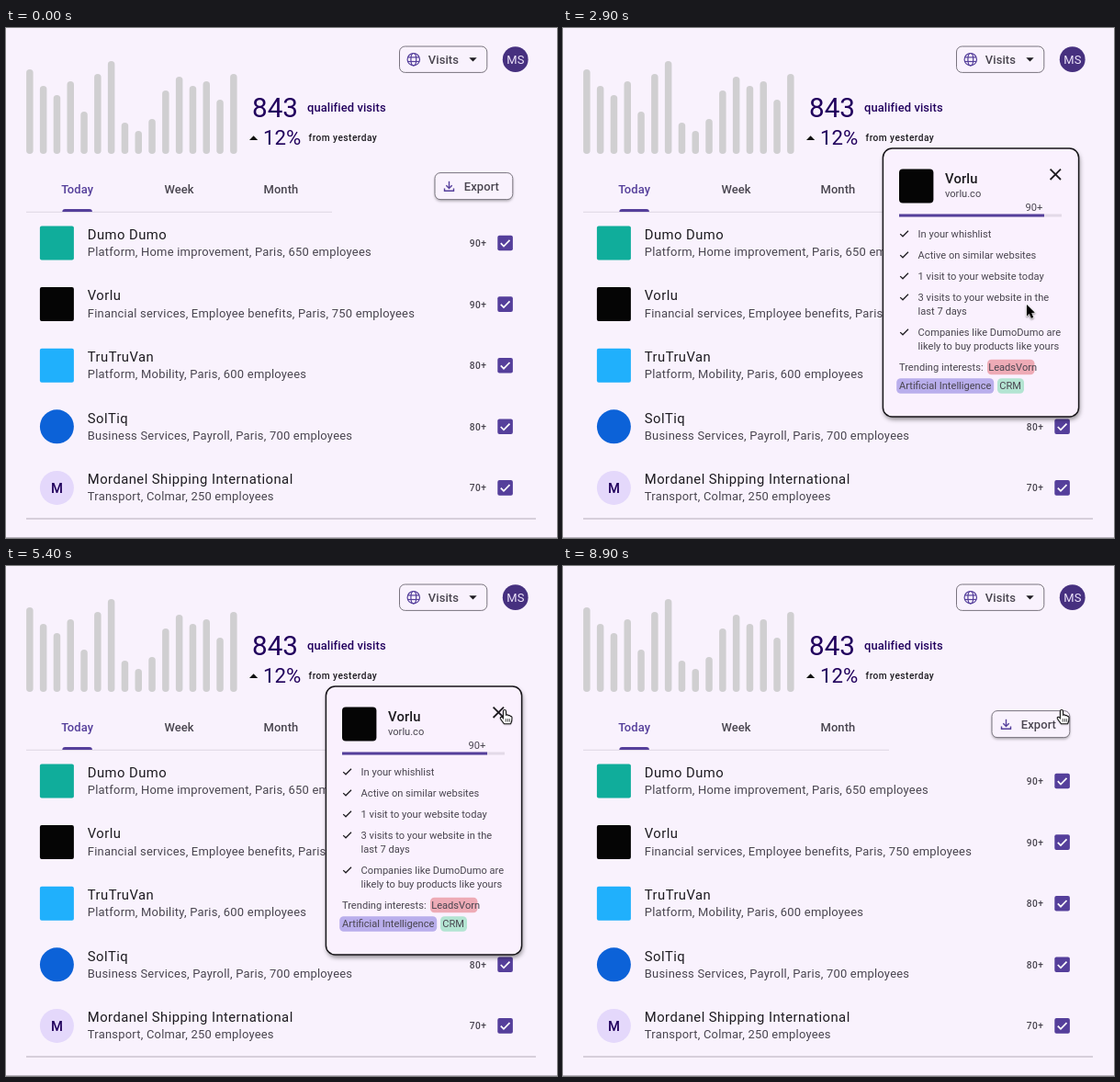
An HTML page with a canvas for the animation above (9000 ms loop, 600x555 px).

```html
<!DOCTYPE html>
<html lang="en">
<head>
<meta charset="utf-8">
<title>Qualified visits</title>
<style>
  html, body { margin: 0; width: 100%; height: 100%; overflow: hidden; background: #f9f2fd; }
  canvas { display: block; width: 600px; height: 555px; }
</style>
</head>
<body>
<canvas id="stage"></canvas>
<script>
const W = 600, H = 555, LOOP = 9000, STEP = 100;
const INK = '#1d1b20', GREY = '#49454f', PURPLE = '#553f9b', DEEP = '#21005d', BG = '#f9f2fd';
const POPUP_OPEN = 1700, POPUP_CLOSE = 5900, HAND_FROM = 4500;

const canvas = document.getElementById('stage');
const dpr = window.devicePixelRatio || 1;
canvas.width = W * dpr;
canvas.height = H * dpr;
const c = canvas.getContext('2d');

const BAR_TOPS = [45, 63, 73, 58, 91, 50, 36, 103, 112, 99, 68, 53, 63, 58, 78, 50];

const ROWS = [
  { name: 'Dumo Dumo', info: 'Platform, Home improvement, Paris, 650 employees', score: '90+', color: '#10ad9b' },
  { name: 'Vorlu', info: 'Financial services, Employee benefits, Paris, 750 employees', score: '90+', color: '#050505' },
  { name: 'TruTruVan', info: 'Platform, Mobility, Paris, 600 employees', score: '80+', color: '#20b0fc' },
  { name: 'SolTiq', info: 'Business Services, Payroll, Paris, 700 employees', score: '80+', color: '#0c62d8', round: true },
  { name: 'Mordanel Shipping International', info: 'Transport, Colmar, 250 employees', score: '70+', color: '#e4d8fb', round: true, initial: 'M' }
];

const REASONS = [
  [228, 'In your whishlist'],
  [251, 'Active on similar websites'],
  [274, '1 visit to your website today'],
  [297, '3 visits to your website in the', 'last 7 days'],
  [335, 'Companies like DumoDumo are', 'likely to buy products like yours']
];

// time, x, y of the pointer tip
const PATH = [
  [100, 300, 492], [800, 383, 318], [1900, 383, 318],
  [2900, 505, 301], [3800, 545, 243], [4600, 543, 157]
];

function text(s, x, y, size, color, { weight = 400, gap = 0, align = 'left' } = {}) {
  c.font = `${weight} ${size}px Roboto, sans-serif`;
  c.letterSpacing = gap + 'px';
  c.textAlign = align;
  c.fillStyle = color;
  c.fillText(s, x, y);
}

function box(x, y, w, h, r, fill, stroke, line = 1) {
  c.beginPath();
  c.roundRect(x, y, w, h, r);
  if (fill) { c.fillStyle = fill; c.fill(); }
  if (stroke) { c.strokeStyle = stroke; c.lineWidth = line; c.stroke(); }
}

function disc(x, y, r, fill) {
  c.beginPath();
  c.arc(x, y, r, 0, Math.PI * 2);
  c.fillStyle = fill;
  c.fill();
}

function trace(points, closed) {
  c.beginPath();
  points.forEach(([x, y], i) => i ? c.lineTo(x, y) : c.moveTo(x, y));
  if (closed) c.closePath();
}

function line(points, color, width) {
  trace(points);
  c.strokeStyle = color;
  c.lineWidth = width;
  c.stroke();
}

function fillShape(points, color) {
  trace(points, true);
  c.fillStyle = color;
  c.fill();
}

function withShadow(color, blur, dx, dy, draw) {
  c.save();
  c.shadowColor = color;
  c.shadowBlur = blur * dpr;
  c.shadowOffsetX = dx * dpr;
  c.shadowOffsetY = dy * dpr;
  draw();
  c.restore();
}

function globe(x, y) {
  c.strokeStyle = PURPLE;
  c.lineWidth = 1.2;
  for (const rx of [6.7, 2.9]) {
    c.beginPath();
    c.ellipse(x, y, rx, 6.7, 0, 0, Math.PI * 2);
    c.stroke();
  }
  for (const dy of [-2.3, 2.3]) line([[x - 6.2, y + dy], [x + 6.2, y + dy]], PURPLE, 1.2);
}

function downloadIcon(x, y) {
  line([[x, y - 5.5], [x, y + 1.8]], PURPLE, 1.4);
  line([[x - 3.2, y - 1], [x, y + 2.2], [x + 3.2, y - 1]], PURPLE, 1.4);
  line([[x - 5, y + 2.3], [x - 5, y + 5], [x + 5, y + 5], [x + 5, y + 2.3]], PURPLE, 1.4);
}

function header() {
  BAR_TOPS.forEach((top, i) => box(22.1 + i * 14.8, top, 7.5, 137 - top, 3.75, '#d0cfd1'));

  text('843', 268, 96.5, 29.6, DEEP);
  text('qualified visits', 328, 91, 12.95, DEEP, { weight: 500, gap: .09 });
  fillShape([[265, 122], [274.2, 122], [269.6, 117.2]], '#111');
  text('12%', 280, 127, 22.2, DEEP);
  text('from yesterday', 329.6, 123, 10.18, INK, { weight: 500, gap: .46 });

  box(428.5, 20, 95.3, 28.4, 6, null, '#79747e');
  globe(443.8, 34.2);
  text('Visits', 459.8, 38.8, 12.95, GREY, { weight: 500, gap: .09 });
  fillShape([[504.3, 32.3], [512.7, 32.3], [508.5, 36.6]], INK);

  disc(554.7, 34.2, 13.9, '#46307f');
  text('MS', 554.9, 38.7, 12.95, '#eee5fb', { align: 'center', gap: .2 });
}

function tabs() {
  box(22, 199.8, 333, 1, 0, '#ddd5e2');
  const style = { weight: 500, gap: .09, align: 'center' };
  text('Today', 77.6, 180.4, 12.95, PURPLE, style);
  text('Week', 188.6, 180.4, 12.95, GREY, style);
  text('Month', 299.4, 180.4, 12.95, GREY, style);
  box(61.3, 197, 32.6, 3, [3, 3, 0, 0], PURPLE);

  withShadow('rgba(0,0,0,.3)', 3, 0, 1.8, () => box(467, 157.6, 84.8, 29, 6, BG));
  box(467, 157.6, 84.8, 29, 6, BG, '#79747e');
  downloadIcon(482.5, 172.3);
  text('Export', 498.8, 176.9, 12.95, GREY, { weight: 500, gap: .09 });
}

function row(r, i) {
  const y = 234 + i * 66.6;
  if (r.round) disc(55.4, y, 18.5, r.color);
  else box(36.9, y - 18.5, 37, 37, 2, r.color);
  if (r.initial) text(r.initial, 55.5, y + 5.3, 14.8, DEEP, { weight: 500, align: 'center' });

  text(r.name, 88.8, y - 4.3, 14.8, INK, { gap: .46 });
  text(r.info, 88.8, y + 14, 12.95, GREY, { gap: .23 });
  text(r.score, 504.8, y + 3.9, 10.18, GREY, { weight: 500, gap: .46 });

  box(535.3, y - 8.3, 16.6, 16.6, 2, PURPLE);
  line([[538.8, y + .2], [542, y + 3.5], [548.5, y - 3.2]], '#fff', 1.7);
}

function chip(s, x, y, w, fill, textX) {
  box(x, y, w, 16.5, 4.5, fill);
  text(s, textX, y + 12.2, 11.1, GREY);
}

function popup() {
  withShadow('rgba(0,0,0,.45)', 5, 1, 3, () => box(348.4, 131, 213.2, 292, 10, BG));
  box(348.4, 131, 213.2, 292, 10, '#faf1fe', '#18161a', 1.5);

  box(366, 153.4, 37.4, 37, 4, ROWS[1].color);
  text(ROWS[1].name, 416, 169.3, 14.8, INK, { weight: 500, gap: .14 });
  text('vorlu.co', 416, 183.5, 11.1, GREY);
  line([[530.6, 153.6], [542, 165]], INK, 1.8);
  line([[542, 153.6], [530.6, 165]], INK, 1.8);

  text('90+', 503.5, 199, 11.1, GREY);
  box(366, 202.6, 177, 2.8, 0, '#e3dae8');
  box(366, 202.6, 158, 2.8, 0, PURPLE);

  for (const [y, first, second] of REASONS) {
    line([[367.2, y - 3.9], [370, y - 1.2], [376, y - 7.2]], INK, 1.25);
    text(first, 386.6, y, 11.1, GREY);
    if (second) text(second, 386.6, y + 15, 11.1, GREY);
  }

  text('Trending interests:', 366, 373, 11.1, GREY);
  chip('LeadsVorn', 462, 360.8, 51.5, '#eeabb6', 463.2);
  chip('Artificial Intelligence', 363.2, 381.2, 106, '#b9aeec', 366);
  chip('CRM', 473, 381.2, 29, '#b3e4d2', 475.3);
}

function outlined(points, fill, stroke, width) {
  trace(points, true);
  c.lineJoin = 'round';
  c.strokeStyle = stroke;
  c.lineWidth = width;
  c.stroke();
  c.fillStyle = fill;
  c.fill();
  c.lineJoin = 'miter';
}

function arrow(x, y) {
  c.save();
  c.translate(x, y);
  withShadow('rgba(0,0,0,.35)', 2, 0, 1, () => outlined(
    [[0, 0], [0, 12.4], [2.8, 9.8], [4.9, 14.8], [7.2, 13.8], [5.1, 8.9], [8.8, 8.8]],
    '#000', '#fff', 1.6));
  c.restore();
}

function hand(x, y) {
  c.save();
  c.translate(x, y);
  c.beginPath();
  c.moveTo(-1.6, 8.6);
  c.lineTo(-1.6, 1.1);
  c.quadraticCurveTo(-1.5, -.5, 0, -.5);
  c.quadraticCurveTo(1.4, -.5, 1.5, 1.1);
  c.lineTo(1.6, 5.2);
  c.quadraticCurveTo(3.4, 4.2, 4, 5.8);
  c.quadraticCurveTo(5.8, 5, 6.2, 6.6);
  c.quadraticCurveTo(7.8, 6.2, 8, 8);
  c.quadraticCurveTo(8.2, 11.6, 6.6, 14.8);
  c.lineTo(-.4, 14.8);
  c.quadraticCurveTo(-2.4, 12.4, -4.6, 9.2);
  c.quadraticCurveTo(-5.2, 7.4, -3.6, 7.2);
  c.quadraticCurveTo(-2.6, 7.3, -1.6, 8.6);
  c.closePath();
  withShadow('rgba(0,0,0,.3)', 2, 0, 1, () => {
    c.fillStyle = '#fff';
    c.fill();
  });
  c.strokeStyle = '#151515';
  c.lineWidth = 1.1;
  c.stroke();
  for (const dx of [1.2, 3.3, 5.3]) line([[dx, 9.2], [dx, 12.6]], '#151515', .8);
  c.restore();
}

function pointerAt(t) {
  const last = PATH.length - 1;
  if (t >= PATH[last][0]) return PATH[last].slice(1);
  const i = PATH.findIndex(p => p[0] > t) - 1;
  const [t0, x0, y0] = PATH[i], [t1, x1, y1] = PATH[i + 1];
  let k = (t - t0) / (t1 - t0);
  if (i === 0 || i === last - 1) k = k * (2 - k);
  return [x0 + (x1 - x0) * k, y0 + (y1 - y0) * k];
}

function draw(t) {
  c.setTransform(dpr, 0, 0, dpr, 0, 0);
  c.fillStyle = BG;
  c.fillRect(0, 0, W, H);
  header();
  tabs();
  ROWS.forEach(row);
  box(22, 533.6, 555, 1, 0, '#b5aeb9');
  box(0, 554, W, 1, 0, '#b9b3bd');
  if (t >= POPUP_OPEN && t < POPUP_CLOSE) popup();
  if (t >= PATH[0][0]) {
    const [x, y] = pointerAt(t);
    (t >= HAND_FROM ? hand : arrow)(x, y);
  }
}

const start = performance.now();
function tick() {
  const t = (performance.now() - start) % LOOP;
  draw(Math.floor(t / STEP) * STEP);
  requestAnimationFrame(tick);
}
tick();
</script>
</body>
</html>
```
